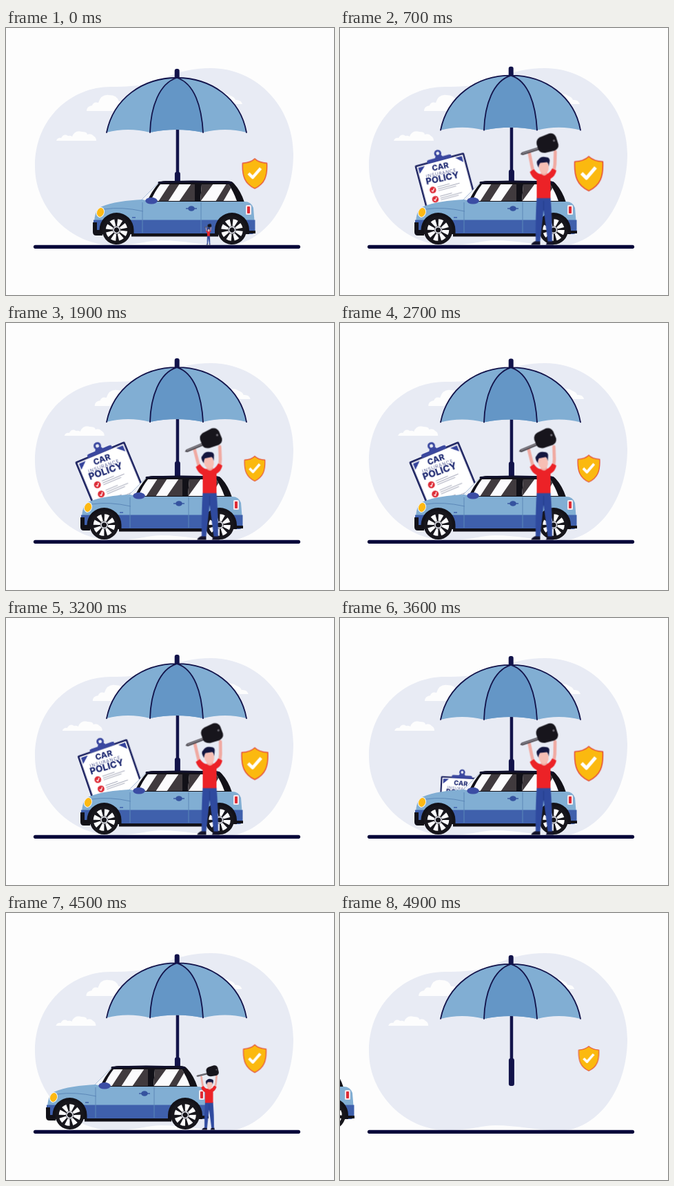
Animation, 476 px wide and 386 px high, one loop 5000 ms. Source, as an HTML page:

```html
<!DOCTYPE html>
<html lang="en">
<head>
<meta charset="utf-8">
<title>Car insurance</title>
<style>
@property --sway { syntax: "<number>"; inherits: true; initial-value: 0; }
@property --drive { syntax: "<number>"; inherits: true; initial-value: 0; }

html, body { margin: 0; width: 100%; height: 100%; overflow: hidden; background: #fdfdfd; }
svg { display: block; width: 476px; height: 386px; }

/* slow parts: a key every 500 ms, drawn at ten pictures a second */
.stage { animation: sway 5s steps(5, end) infinite; }
.shield { animation: pulse 5s steps(5, end) infinite; }
/* quick parts: a key every 100 ms */
.car { animation: drive 5s step-end infinite; transform: translateX(calc(var(--drive) * 1px)); }
.board { animation: board 5s step-end infinite; }
.man { animation: grow 5s step-end infinite; }

.wheel { transform: rotate(calc(var(--drive) * 2.73deg)); }
.clouds { transform: translateX(calc(var(--sway) * 1.48px)); }
.umbrella { transform: translateY(calc(var(--sway) * -1px)); }
.head { transform-origin: 296px 212px; transform: rotate(calc(var(--sway) * -1.5deg)); }
.arm-l { transform-origin: 280px 209px; transform: rotate(calc(var(--sway) * -.7deg)); }
.arm-r { transform-origin: 310px 209px; transform: rotate(calc(var(--sway) * -.9deg)); }
.key { transform: translate(calc(303.5px - var(--sway) * .8px), 167px) rotate(calc(-14deg - var(--sway) * 1.1deg)); }

@keyframes sway {
  0% { --sway: 0; } 10% { --sway: 2.3; } 20% { --sway: 4.9; } 30% { --sway: 7.1; }
  40% { --sway: 8.1; } 50% { --sway: 8.1; } 60% { --sway: 6.8; } 70% { --sway: 4.6; }
  80% { --sway: 1.9; } 90% { --sway: -.4; } 100% { --sway: -2.3; }
}
@keyframes pulse {
  0% { transform: scale(.86); } 10% { transform: scale(1.01); } 20% { transform: scale(.97); }
  30% { transform: scale(.82); } 40% { transform: scale(.695); } 50% { transform: scale(.71); }
  60% { transform: scale(.87); } 70% { transform: scale(1); } 80% { transform: scale(.97); }
  90% { transform: scale(.8); } 100% { transform: scale(.69); }
}
@keyframes drive {
  0% { --drive: 18; } 2% { --drive: 11; } 4% { --drive: 6; } 6% { --drive: 3; } 8% { --drive: 1; }
  10%, 84% { --drive: 0; }
  86% { --drive: -4.5; } 88% { --drive: -20; } 90% { --drive: -50; } 92% { --drive: -94; }
  94% { --drive: -154; } 96% { --drive: -230; } 98%, 100% { --drive: -323; }
}
@keyframes grow {
  0% { transform: scale(.19); } 2% { transform: scale(.42); } 4% { transform: scale(.64); }
  6% { transform: scale(.82); } 8% { transform: scale(.94); }
  10%, 84% { transform: scale(1); }
  86% { transform: scale(.95); } 88% { transform: scale(.8); } 90% { transform: scale(.58); }
  92% { transform: scale(.34); } 94% { transform: scale(.12); } 96%, 100% { transform: scale(0); }
}
@keyframes board {
  0%, 6% { transform: translate(205px, 265px) rotate(10deg) scale(.2); }
  8% { transform: translate(188px, 246px) rotate(8deg) scale(.62); }
  10% { transform: translate(173px, 226px) rotate(1deg) scale(.8); }
  12% { transform: translate(157px, 204px) rotate(-7deg) scale(.88); }
  14% { transform: translate(144px, 189.5px) rotate(-15deg) scale(.95); }
  16% { transform: translate(138.5px, 187px) rotate(-19.5deg) scale(.985); }
  18%, 60% { transform: translate(136px, 186px) rotate(-22.6deg); }
  62% { transform: translate(137px, 186px) rotate(-21.5deg) scale(.99); }
  64% { transform: translate(139.5px, 187px) rotate(-19deg) scale(.98); }
  66% { transform: translate(144px, 189.5px) rotate(-15deg) scale(.95); }
  68% { transform: translate(152px, 198px) rotate(-10deg) scale(.91); }
  70% { transform: translate(164px, 213px) rotate(-3.5deg) scale(.85); }
  72% { transform: translate(177px, 230px) rotate(3deg) scale(.78); }
  74% { transform: translate(190px, 247px) rotate(10deg) scale(.6); }
  76%, 100% { transform: translate(205px, 265px) rotate(10deg) scale(.2); }
}

text { font-family: Inter, "Open Sans", sans-serif; text-anchor: middle; fill: #1f2a72; }
.bold { font-weight: 800; }
.navy { fill: #12134a; }
.line { fill: none; stroke: #12134a; stroke-width: 1.8; stroke-linecap: round; stroke-linejoin: round; }
</style>
</head>
<body>
<svg class="stage" viewBox="0 0 476 386">
  <defs>
    <g id="wheel">
      <circle r="21" fill="#17161c"/>
      <circle r="10.8" fill="none" stroke="#fbfbfd" stroke-width="10" stroke-dasharray="5.2 3.282"/>
      <circle r="5.4" fill="#d9dae2"/>
      <circle r="3.6" fill="#17161c"/>
    </g>
    <g id="item">
      <circle r="5" fill="#dd2b36"/>
      <path d="M-2.3 .1L-.6 2L2.6-2" fill="none" stroke="#fff" stroke-width="1.4"/>
      <path d="M8-2.6H27M8 .4H42M8 3.2H36" stroke="#8d91a6" stroke-width=".8"/>
    </g>
    <clipPath id="glass">
      <path d="M206 226H256V250H192Q198 236 206 226ZM266 226H305Q312 236 317 250H264Z"/>
    </clipPath>
  </defs>

  <path fill="#e8ebf4" d="M42 200C42 130 95 85 152 85C200 85 210 80 235 70C255 62 275 58 297 58C365 58 417 115 417 182C417 245 385 300 335 313C300 318 265 307 225 307C200 308 190 314 155 314C95 314 42 262 42 200Z"/>

  <g class="clouds" fill="#fdfdfd">
    <path d="M73 163Q75 158 80 159Q84 152 90 156Q94 155 96 157Q100 147 110 150Q118 150 118 154Q124 152 127 156Q131 158 131 163Z"/>
    <path d="M117 120Q117 113 125 112Q127 106 134 108Q138 95 150 97Q161 97 164 106Q174 105 176 113Q181 115 181 120Z"/>
    <path d="M290 110Q296 98 310 98Q318 92 326 98Q332 100 333 104Q341 103 343 110Z"/>
  </g>

  <g class="umbrella">
    <rect class="navy" x="244.700" y="59" width="7" height="16" rx="3"/>
    <rect class="navy" x="246.700" y="145" width="4.500" height="66"/>
    <rect class="navy" x="244.900" y="208" width="8" height="40" rx="3"/>
    <path fill="#81aed3" d="M146 151C156 102 198 72 248 72C298 72 340 102 349 151Q318 143 286 151Q247 143 209 151Q177 143 146 151Z"/>
    <path fill="#6496c6" d="M248 72C222 80 210 115 209 151Q247 143 286 151C284 115 274 80 248 72Z"/>
    <path class="line" d="M146 151C156 102 198 72 248 72C298 72 340 102 349 151M209 151C210 115 222 80 248 72C274 80 284 115 286 151"/>
  </g>

  <g transform="translate(361 210.500)">
    <g class="shield">
      <path fill="#fbb90f" stroke="#e5533c" stroke-width="1.600" stroke-linejoin="round" d="M0-25C5-20 12-18 20.500-17.500C21.500 4 17 17 0 25C-17 17-21.500 4-20.500-17.500C-12-18-5-20 0-25Z"/>
      <path fill="none" stroke="#fff" stroke-width="5" stroke-linejoin="round" d="M-10.500-.5L-3.500 6.500L10-9"/>
    </g>
  </g>

  <path stroke="#06063a" stroke-width="5.200" stroke-linecap="round" d="M42.500 316.300H424.500"/>

  <g class="car">
    <g class="board">
      <circle cy="-9" r="4" fill="none" stroke="#3a479f" stroke-width="3"/>
      <rect x="-39" width="78" height="85" rx="2" fill="#1c2260"/>
      <rect x="-36.300" y="2.700" width="72.600" height="79.600" fill="#fff"/>
      <path fill="#35439c" d="M-34.500 4.500H-24L-34.500 14ZM34.500 4.500H24L34.500 14Z"/>
      <path fill="#3a479f" d="M-19 2.500V-1Q-19-3-16-3H-6L-4-6H4L6-3H16Q19-3 19-1V2.500Z"/>
      <g transform="rotate(3 -2 22)">
        <text class="bold" x="-2" y="15.800" font-size="12">CAR</text>
        <text x="-2.500" y="23.800" font-size="6.800" font-weight="300" letter-spacing=".9">INSURANCE</text>
        <text class="bold" x="-2.500" y="34" font-size="13.600">POLICY</text>
      </g>
      <use href="#item" x="-21.500" y="43"/>
      <use href="#item" x="-21.500" y="57.500"/>
      <use href="#item" x="-21.500" y="72"/>
    </g>

    <!-- cabin -->
    <path fill="#f1f3f8" stroke="#9fb6d2" stroke-width=".8" d="M176 251L204 223H209L192 251Z"/>
    <path fill="#121118" d="M186 252Q194 235 203 225Q206 221 214 221H302Q310 221 313 225Q323 236 328 252Z"/>
    <g clip-path="url(#glass)">
      <rect x="185" y="224" width="135" height="28" fill="#fbfbfd"/>
      <path fill="#403a3e" d="M220 225H234L217 251H203ZM251 225H257V251H233ZM264 225H283L264 251ZM302 225H312L297 251H286Z"/>
    </g>
    <path fill="none" stroke="#10102c" stroke-width="3" stroke-linecap="round" d="M204 223.500Q250 220.500 309 223.500"/>

    <!-- body -->
    <path fill="#81aed3" d="M110 285C110 270 113 262 120 258.500C135 252 158 249 180 248L192 251H328Q338 251 341 260L343 285Z"/>
    <path fill="#3f60ac" d="M109 277.500H343.500V293Q343 298 338 298H112Q109 298 109 293Z"/>
    <path fill="#121118" d="M108 281H114V292H122V300H113Q108 300 108 295ZM164 297H290V301.500H164ZM331 293H344V297H331Z"/>
    <path fill="none" stroke="#5c88b8" d="M180 252V296M265 252V296M181 265Q150 258 124 262"/>
    <path stroke="#3f60ac" stroke-width="1.500" d="M165 274H170"/>
    <path stroke="#35539f" stroke-width="1.400" d="M243 261H259"/>
    <ellipse cx="251" cy="261" rx="4.800" ry="3.800" fill="#35539f"/>
    <ellipse cx="119" cy="266.500" rx="5.400" ry="7" fill="#fdb913" stroke="#f5f6fa" transform="rotate(18 119 266.500)"/>
    <ellipse cx="193" cy="249.800" rx="8.800" ry="4.800" fill="#3b4da4"/>
    <rect x="330" y="256" width="8" height="14" rx="1.500" fill="#f5e6ea"/>
    <rect x="332" y="258" width="4" height="10" rx="1" fill="#df2b33"/>
    <path fill="#121118" d="M117.500 298V292A25 25 0 0 1 167.500 292V298ZM285 298V292A25 25 0 0 1 335 292V298Z"/>
    <g transform="translate(142.500 292)"><use href="#wheel" class="wheel"/></g>
    <g transform="translate(310 292)"><use href="#wheel" class="wheel"/></g>
  </g>

  <g transform="translate(293.500 313.500)">
    <g class="man"><g transform="translate(-293.500 -313.500)">
      <path fill="#15142c" d="M277.500 313.500Q278 310 285 307.500H290.500V313.500ZM299 313.500Q299.500 310 303 307.500H308L310 313.500Z"/>
      <path fill="#2f4a9f" d="M285.500 244H305.500Q308 275 308 308.500H301.500L295.500 263L290.500 308.500H284Q283.500 275 285.500 244Z"/>
      <path fill="none" stroke="#233a86" stroke-width=".9" d="M295.500 250V264"/>
      <g fill="none" stroke="#f0aaa2" stroke-width="4.600" stroke-linecap="round" stroke-linejoin="round">
        <path class="arm-l" d="M280.500 209L278.500 197L276 181"/>
        <path class="arm-r" d="M310 209L312.500 197L314 179"/>
      </g>
      <path fill="#ec2227" d="M275.500 208L281.500 204Q285.500 210 290 211H300Q304 210 308 203L314 206Q312.500 214 305.500 218V246H285.500V220Q278 216 275.500 208Z"/>
      <g class="head">
        <path fill="#f0aaa2" d="M292 205H301V211Q297 216 292 211Z"/>
        <ellipse cx="296.700" cy="201" rx="7.200" ry="10" fill="#f7beb4"/>
        <path fill="#14163f" d="M289 201Q285 192 289.500 190Q294 184.500 301 187Q308 188 305.500 195L304 201Q304 196 302 194.500H292Q290 197 289 201Z"/>
      </g>
      <g class="key">
        <path fill="#47444b" d="M-10 1H-39L-42 3L-39 5.200H-10Z"/>
        <path stroke="#aaa7b0" stroke-width="1" d="M-39 2.700H-13"/>
        <path fill="#17151c" d="M-15-4Q-14-11-7-12L7-13Q14-12 15-5V6Q14 12 7 13L-7 12Q-14 10-15 5Z"/>
        <circle cx="10.500" cy="-1" r="1.600" fill="#6d6a74"/>
      </g>
    </g></g>
  </g>
</svg>
</body>
</html>
```
